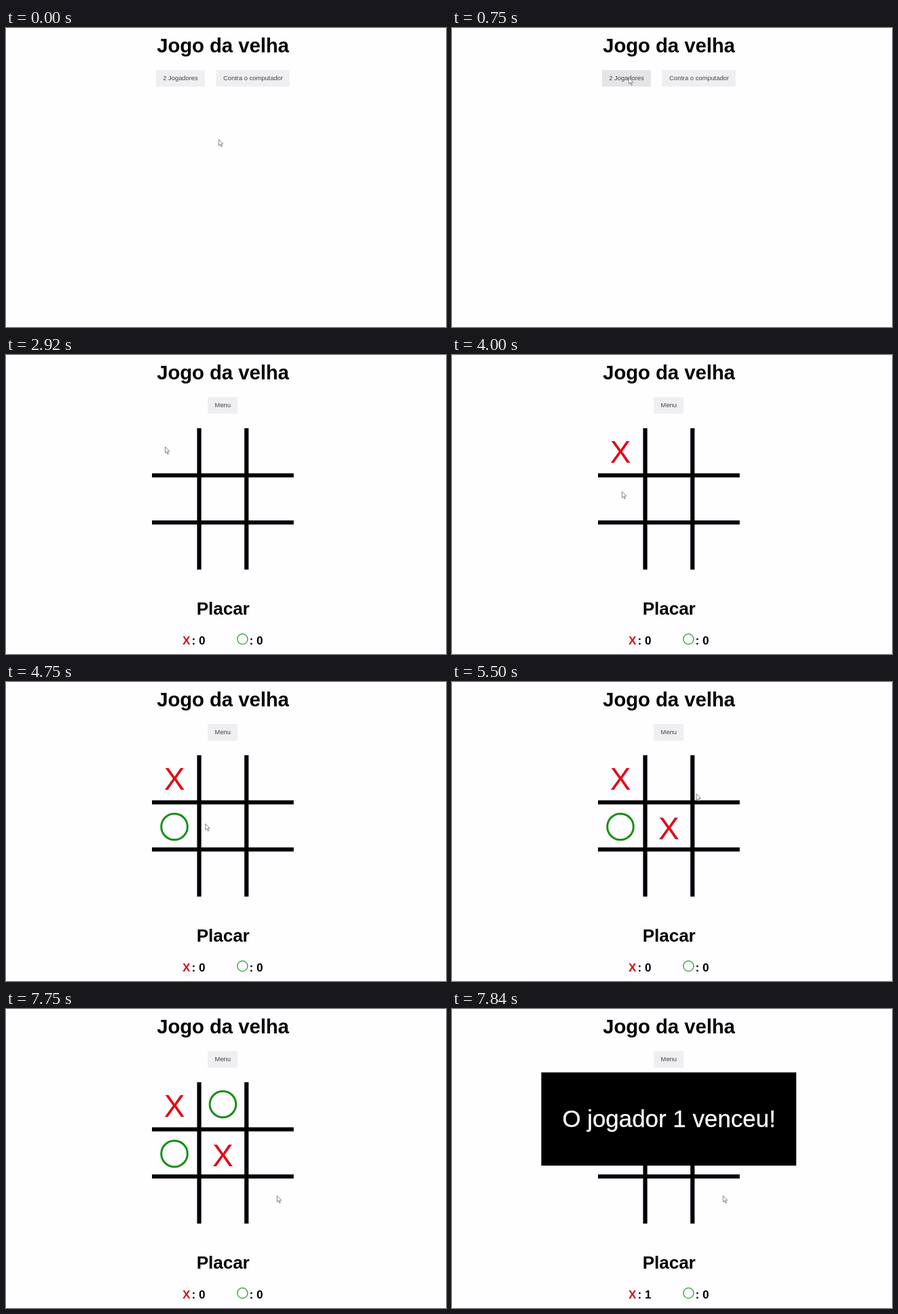
These frames come from a looping animation (648x441 px, 8 s). An HTML page:

```html
<!DOCTYPE html>
<html lang="pt">
<head>
<meta charset="utf-8">
<title>Jogo da velha</title>
<style>
  html, body { margin: 0; width: 100%; height: 100%; overflow: hidden; background: #fefdff; }
  svg { display: block; font-family: "Liberation Sans", Arial, sans-serif; }
  .bold { font-weight: bold; }
  .mid { text-anchor: middle; }
  .button rect { fill: #efeef0; }
  .button.hover rect { fill: #e5e4e6; }
  .button text { font-size: 9.35px; fill: #444; text-anchor: middle; }
  .score { font-size: 17px; font-weight: bold; }
  .x { font-size: 46px; fill: #e20a14; text-anchor: middle; }
  .o { fill: none; stroke: #159013; stroke-width: 3; }
</style>
</head>
<body>
<svg width="648" height="441" viewBox="0 0 648 441">
  <text class="bold mid" x="319.5" y="35.5" font-size="29.2">Jogo da velha</text>

  <g id="menu">
    <g class="button" id="twoPlayers">
      <rect x="221" y="62" width="72" height="24.5"/><text x="257" y="77.2">2 Jogadores</text>
    </g>
    <g class="button" id="computer">
      <rect x="309.3" y="62" width="108.2" height="24.5"/><text x="364" y="77.2">Contra o computador</text>
    </g>
  </g>

  <g id="game">
    <g class="button">
      <rect x="297" y="62" width="44" height="24.5"/><text x="319.3" y="77.2">Menu</text>
    </g>
    <path d="M284.5 108V316.5M354.2 108V316.5M215 177.5H423.7M215 247H423.7" stroke="#000" stroke-width="6.2"/>
    <g id="pieces"></g>
    <text class="bold mid" x="319.7" y="383" font-size="26">Placar</text>
    <g class="score">
      <text x="260" y="427" fill="#d4101c">X</text>
      <text x="273.5" y="427">: <tspan id="wins">0</tspan></text>
      <circle cx="348.3" cy="419" r="7.6" fill="none" stroke="#2f9a2f" stroke-width="1.3"/>
      <text x="358.5" y="427">: 0</text>
    </g>
    <g id="banner">
      <rect x="131.5" y="93.5" width="375.5" height="137.5"/>
      <text class="mid" x="319.5" y="174" font-size="34.9" fill="#fff" stroke="#fff" stroke-width=".3">O jogador 1 venceu!</text>
    </g>
  </g>

  <path id="cursor" d="M.4.4V9.6L2.5 7.7L4 11.2L5.4 10.6L3.9 7.1H6.8Z" fill="#fff" stroke="#666" stroke-width=".8"/>
</svg>
<script>
const LOOP = 8000, FPS = 12;
const GAME_START = 20, GAME_WON = 94;
const byId = id => document.getElementById(id);

// Players alternate, X first; step is when the piece lands.
const turns = [
  { step: 37, col: 0, row: 0 },
  { step: 49, col: 0, row: 1 },
  { step: 61, col: 1, row: 1 },
  { step: 81, col: 1, row: 0 }
];

// Straight cursor moves: first step, last step, end point. It rests in between.
const home = { x: 313, y: 164 };
const moves = [
  [5, 8, 311, 79], [8, 9, 260, 73], [GAME_START, 25, 254, 101],
  [28, 31, 237, 158], [32, 35, 234, 135],
  [37, 47, 250, 201], [50, 60, 312, 212],
  [61, 69, 388, 136], [69, 73, 384, 153], [76, 79, 331, 145],
  [81, 90, 398.8, 275]
];

const pieces = turns.map(({ col, row }, i) => {
  const x = 248 + 71.4 * col, y = 140.5 + 73 * row;
  return i % 2
    ? `<circle class="o" cx="${x}" cy="${y}" r="19.3"/>`
    : `<text class="x" x="${x}" y="${y + 18.5}">X</text>`;
});
byId("pieces").innerHTML = pieces.join("");

function cursorAt(step) {
  return moves.reduce(({ x, y }, [from, to, endX, endY]) => {
    const k = Math.min(1, Math.max(0, (step - from) / (to - from)));
    return { x: x + (endX - x) * k, y: y + (endY - y) * k };
  }, home);
}

const show = (node, on) => node.setAttribute("display", on ? "inline" : "none");

function draw(now) {
  const step = Math.floor((now % LOOP) * FPS / 1000);
  const won = step >= GAME_WON;
  const { x, y } = cursorAt(step);
  byId("cursor").setAttribute("transform", `translate(${x} ${y})`);

  show(byId("menu"), step < GAME_START);
  show(byId("game"), step >= GAME_START);
  show(byId("banner"), won);
  byId("wins").textContent = won ? 1 : 0;
  turns.forEach((turn, i) => show(byId("pieces").children[i], step >= turn.step && !won));

  const overRow = y > 62 && y < 86.5;
  byId("twoPlayers").classList.toggle("hover", overRow && x < 293);
  byId("computer").classList.toggle("hover", overRow && x > 309);
}

const start = performance.now();
function tick() {
  draw(performance.now() - start);
  requestAnimationFrame(tick);
}
tick();
</script>
</body>
</html>
```
